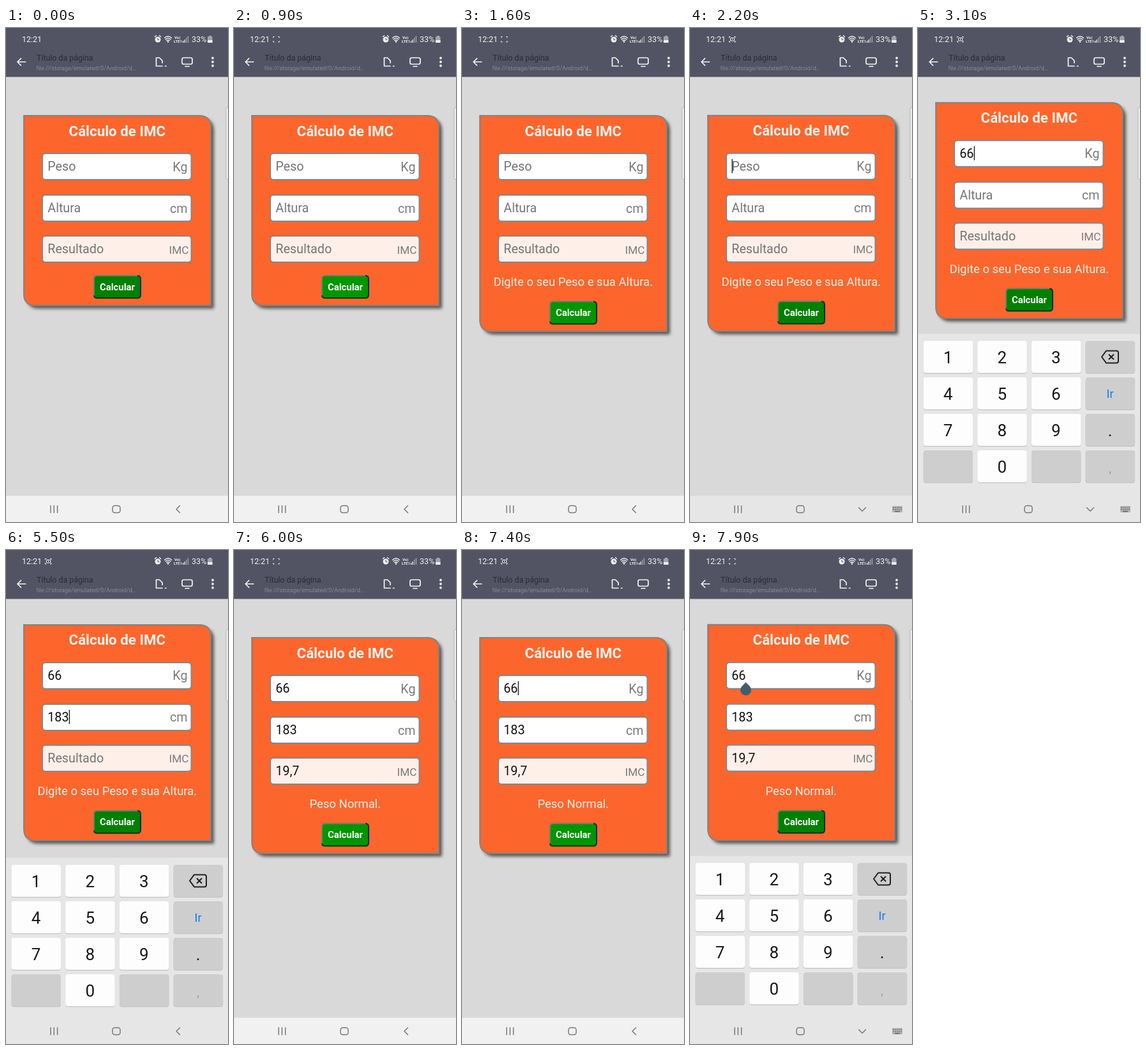
Write an HTML page that moves like this. It is 348 by 772 pixels and loops after 8 s.

```html
<!DOCTYPE html>
<html lang="pt">
<head>
<meta charset="utf-8">
<title>Cálculo de IMC</title>
<style>
  html, body { margin: 0; width: 100%; height: 100%; overflow: hidden; background: #d9d9d9; }
  svg { display: block; width: 100%; height: 100%; font-family: Roboto, sans-serif; }
  .line { fill: none; stroke: #f4f4f6; stroke-width: 1.7; stroke-linecap: round; stroke-linejoin: round; }
  .field { stroke: #85878a; stroke-width: 2; }
  .value { font-size: 19.7px; }
  .mid { text-anchor: middle; }
  #nav .line { stroke: #77797c; stroke-width: 1.5; }
</style>
</head>
<body>
<svg viewBox="0 0 348 772" preserveAspectRatio="none">
  <defs>
    <filter id="blur" x="-10%" y="-10%" width="120%" height="120%"><feGaussianBlur stdDeviation="2.5"/></filter>
  </defs>
  <rect width="348" height="772" fill="#d9d9d9"/>

  <g id="card">
    <path id="shadow" fill="#000" fill-opacity=".6" filter="url(#blur)" transform="translate(5 5)"/>
    <path id="panel" fill="#fc662d" stroke="#85827f" stroke-width="2"/>
    <text class="mid" x="174.3" y="168.5" font-size="22.3" font-weight="700" fill="#fff4ef">Cálculo de IMC</text>
    <g id="fields"></g>
    <text id="note" class="mid" x="174.3" y="403" font-size="18.5" fill="#fff0e8"></text>
    <g id="button">
      <rect id="face" x="138" y="387" width="73" height="35" rx="5"/>
      <path d="M138 418V392Q138 387 143 387H206" fill="none" stroke="#6c7f70" stroke-width="2"/>
      <path d="M206 387Q211 387 211 392V417Q211 422 206 422H143Q138 422 138 418" fill="none" stroke="#173019" stroke-width="2"/>
      <text class="mid" x="174.5" y="409.5" font-size="14.8" font-weight="700" fill="#fff">Calcular</text>
    </g>
    <rect id="caret" width="1.3" height="22" fill="#111"/>
    <path id="handle" d="M87.5 227L93.5 233A8.5 8.5 0 1 1 81.5 233Z" fill="#405f6c"/>
  </g>
  <rect x="345" y="124.500" width="5" height="112" rx="2" fill="#ececec" stroke="#b4b4b6"/>

  <rect width="348" height="76.500" fill="#525463"/>
  <g fill="#f2f2f4">
    <text x="25" y="22" font-size="12.5">12:21</text>
    <text x="291" y="22" font-size="12.6">33%</text>
    <text x="264" y="16.500" font-size="6" font-weight="700">Vo)</text>
    <text x="263" y="23" font-size="6" font-weight="700">LTE1</text>
    <path d="M277 20h1.300v3h-1.300zM279.500 18h1.300v5h-1.300z"/>
    <path d="M282 15h1.300v8h-1.300zM284.800 12.500h1.300v10.500h-1.300z" opacity=".55"/>
    <path d="M318 12h4v1.500h1.500v9.500h-7.500v-9.500h2z" opacity=".5"/>
    <path d="M316 19h7.500v4h-7.500z"/>
    <circle cx="238" cy="18" r="4.500"/>
    <path d="M233 14l3-2.500M243 14l-3-2.500" stroke="#f2f2f4" stroke-width="1.500"/>
    <circle cx="254" cy="21.500" r="1.300"/>
    <circle cx="324" cy="47" r="1.900"/><circle cx="324" cy="53" r="1.900"/><circle cx="324" cy="59" r="1.900"/>
  </g>
  <path d="M238 15.500V18.500H240.500" fill="none" stroke="#525463"/>
  <path class="line" stroke-width="1.300" style="stroke-width:1.3" d="M248.500 15.500Q254 10.500 259.500 15.500M250 17.700Q254 14 258 17.700M251.800 19.700Q254 17.800 256.200 19.700"/>
  <g id="capture" fill="none" stroke="#e8e8ec">
    <path d="M61.500 15.500V13.500H63.500M69 13.500H71V15.500M71 20V22H69M63.500 22H61.500V20"/>
    <path id="lens" d="M63.500 15.500H69.500V20H63.500ZM66.500 16.500V19"/>
  </g>
  <path class="line" d="M30.500 53H18M23.500 47.500L18 53L23.500 58.500M245 54.500V51L240.500 46.500H235.500V59.500H245M249.500 59.500H251M278.500 46.500H289.500Q292 46.500 292 49V54Q292 56.500 289.500 56.500H278.500Q276 56.500 276 54V49Q276 46.500 278.500 46.500M281 60H287"/>
  <text x="48" y="51" font-size="12.400" fill="#292b36">Título da página</text>
  <text x="47.500" y="66" font-size="9.200" fill="#898a97">file:///storage/emulated/0/Android/d...</text>

  <g id="keyboard"><rect y="478" width="348" height="294" fill="#e6e6e6"/></g>

  <g id="nav">
    <rect id="navBack" y="731" width="348" height="41"/>
    <path class="line" d="M70 746.500V757.500M75.300 746.500V757.500M80.600 746.500V757.500"/>
    <rect class="line" x="167" y="746.500" width="12" height="11" rx="3.500"/>
    <path id="arrow" class="line"/>
    <g id="switcher">
      <rect x="317" y="747" width="16" height="10" fill="#b5b5b5"/>
      <path d="M318 749.500H333M318 752.500H333" stroke="#606265" stroke-width="1.500" stroke-dasharray="1.500 1.500"/>
      <path d="M321 755.500H329" stroke="#606265" stroke-width="1.500"/>
    </g>
  </g>
</svg>

<script>
const LOOP = 8000;
const $ = id => document.getElementById(id);
const show = (id, on) => $(id).style.display = on ? '' : 'none';

function add(parent, tag, attrs, text = '') {
  const node = document.createElementNS('http://www.w3.org/2000/svg', tag);
  for (const name in attrs) node.setAttribute(name, attrs[name]);
  node.textContent = text;
  return parent.appendChild(node);
}

// Each step changes part of the form's state from its time onwards.
const start = { peso: '', altura: '', resultado: '', note: '', focus: null, hot: false, open: false };
const steps = [
  [900, { hot: true }],
  [1100, { note: 'Digite o seu Peso e sua Altura.' }],
  [2000, { focus: 'peso' }],
  [2200, { open: true, hot: false }],
  [2800, { peso: '6' }],
  [3000, { peso: '66' }],
  [3400, { focus: 'altura' }],
  [3900, { altura: '1' }],
  [4100, { altura: '18' }],
  [4300, { altura: '183' }],
  [5500, { open: false }],
  [5600, { focus: null, hot: true }],
  [6000, { resultado: '19,7', note: 'Peso Normal.' }],
  [7400, { focus: 'peso' }],
  [7500, { open: true, hot: false }]
];
const presses = [
  ['6', 2700, 2800, '#a5a5a5'], ['6', 2900, 3000, '#a5a5a5'],
  ['1', 3800, 3900, '#a5a5a5'], ['8', 4000, 4100, '#a5a5a5'],
  ['3', 4200, 4300, '#a5a5a5'], ['3', 4300, 4600, '#d8d8d8']
];

const fields = {};
[['peso', 'Peso', 'Kg', 196], ['altura', 'Altura', 'cm', 261], ['resultado', 'Resultado', 'IMC', 325]]
  .forEach(([id, hint, unit, y]) => {
    const isResult = id === 'resultado';
    add($('fields'), 'rect', { class: 'field', x: 57, y, width: 233.5, height: 41, rx: 5, fill: isResult ? '#ffefe9' : '#fff' });
    const text = add($('fields'), 'text', { class: 'value', x: 65.3, y: y + 27 });
    add($('fields'), 'text', {
      x: isResult ? 286.5 : 284.5, y: y + 27.5, 'text-anchor': 'end', fill: '#7b7b7b', 'font-size': isResult ? 17.3 : 19.7
    }, unit);
    fields[id] = { text, hint, y };
  });

const keys = {};
[['1', '2', '3', 'del'], ['4', '5', '6', 'Ir'], ['7', '8', '9', '.'], ['', '0', '', ',']].forEach((row, r) =>
  row.forEach((label, c) => {
    const x = 8.5 + 84.7 * c, y = 489 + 57 * r, isDigit = /\d/.test(label);
    const box = { x, width: 77.5, height: 50, rx: 4 };
    add($('keyboard'), 'rect', { ...box, y: y + 1.2, fill: '#c3c3c3' });
    const face = add($('keyboard'), 'rect', { ...box, y, fill: isDigit ? '#fdfdfd' : '#cecece' });
    if (isDigit) keys[label] = face;
    if (label === 'del') {
      add($('keyboard'), 'path', {
        d: 'M295 504.500H311Q314 504.500 314 507.500V520.500Q314 523.500 311 523.500H295L288 514ZM299 510L307 518M307 510L299 518',
        fill: 'none', stroke: '#222', 'stroke-width': 2, 'stroke-linejoin': 'round'
      });
    } else {
      add($('keyboard'), 'text', {
        class: 'mid', x: x + 38.5, y: y + (label === 'Ir' ? 32 : 35.3),
        'font-size': label === 'Ir' ? 18 : label === ',' ? 19 : 26,
        fill: label === 'Ir' ? '#0b7bf5' : label === ',' ? '#999' : '#171717'
      }, label);
    }
  }));

function ramp(t, from, to) {
  const p = Math.min(1, Math.max(0, (t - from) / (to - from)));
  return 1 - (1 - p) ** 2;
}

function draw(t) {
  const state = { ...start };
  let caretStart = 0;
  for (const [time, change] of steps) {
    if (time > t) break;
    Object.assign(state, change);
    if (change.focus || change.peso || change.altura) caretStart = time;
  }

  for (const id in fields) {
    const { text, hint } = fields[id];
    text.textContent = state[id] || hint;
    text.setAttribute('fill', state[id] ? '#111' : '#757575');
  }

  const bottom = state.note ? 474 : 433.5;
  const outline = `M28 137H303Q321 137 321 155V${bottom}H46Q28 ${bottom} 28 ${bottom - 18}Z`;
  $('panel').setAttribute('d', outline);
  $('shadow').setAttribute('d', outline);
  $('note').textContent = state.note;
  $('button').setAttribute('transform', `translate(0 ${state.note ? 40.5 : 0})`);
  $('face').setAttribute('fill', state.hot ? '#009600' : '#008000');

  const blinkOn = Math.floor((t - caretStart) / 500) % 2 === 0;
  show('caret', state.focus && blinkOn);
  if (state.focus) {
    $('caret').setAttribute('x', 65.5 + 11.07 * state[state.focus].length);
    $('caret').setAttribute('y', fields[state.focus].y + 9);
  }
  show('handle', t >= 7600);

  const raised = ramp(t, 2200, 2500) - ramp(t, 5500, 5700) + ramp(t, 7500, 7800);
  $('card').setAttribute('transform', `translate(0 ${-20.3 * raised})`);
  $('keyboard').setAttribute('transform', `translate(0 ${294 * (1 - raised)})`);
  for (const label in keys) {
    const press = presses.find(([key, from, to]) => key === label && t >= from && t < to);
    keys[label].setAttribute('fill', press ? press[3] : '#fdfdfd');
  }

  $('navBack').setAttribute('fill', raised > 0 ? '#e6e6e6' : '#f1f1f1');
  $('arrow').setAttribute('d', state.open ? 'M264.500 749.500L270 755L275.500 749.500' : 'M272.500 746.500L267 752L272.500 757.500');
  show('switcher', state.open);

  show('capture', t >= 100);
  show('lens', Math.floor((t - 100) / 500) % 2 === 0);
}

const began = performance.now();
function tick() {
  draw((performance.now() - began) % LOOP);
  requestAnimationFrame(tick);
}
tick();
</script>
</body>
</html>
```
